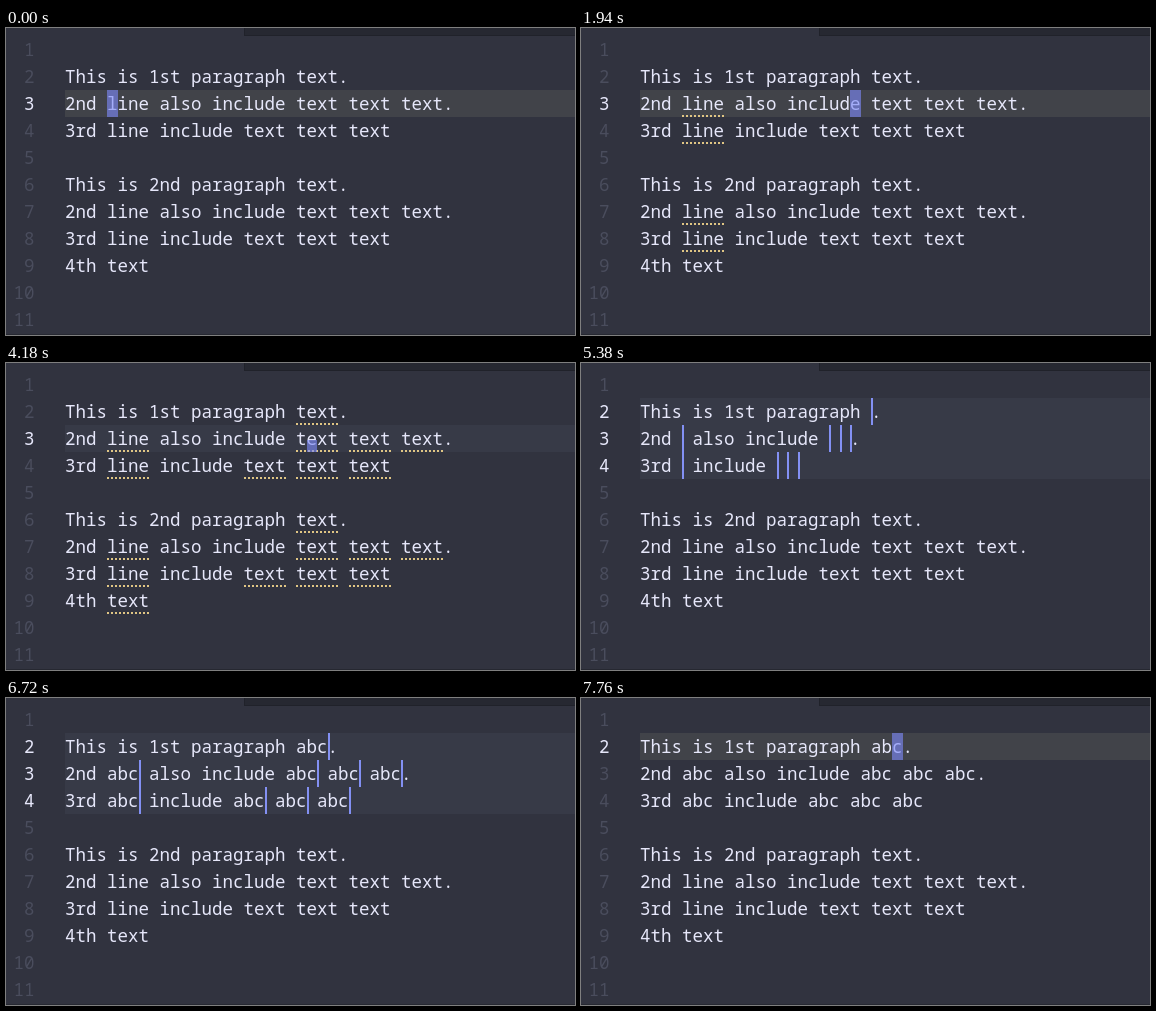
An HTML page with a canvas that plays this animation: 569x307 px, repeating every 8000 ms.

```html
<!DOCTYPE html>
<html lang="en">
<head>
<meta charset="utf-8">
<title>Multiple cursors in a text editor</title>
<style>
  html, body { margin: 0; width: 100%; height: 100%; overflow: hidden; background: #31333f; }
  canvas { display: block; }
</style>
</head>
<body>
<canvas id="stage" width="569" height="307"></canvas>
<script>
const ctx = document.getElementById('stage').getContext('2d');
const WIDTH = 569, HEIGHT = 307, LOOP = 8000;
const LEFT = 59, TOP = 8, CELL = 10.5, ROW = 27, ROW_COUNT = 11;
const FONT = '17.5px "Noto Sans Mono", "DejaVu Sans Mono", monospace';
const COLOR = {
  back: '#31333f', tabBar: '#262831', border: '#20222a',
  text: '#e6e7fa', gutter: '#4a4d5d',
  normalLine: '#414349', pendingLine: '#373a47',
  block: 'rgba(124, 138, 248, 0.62)', bar: '#8390f3', underline: '#dfc584'
};

const LINES = [
  '',
  'This is 1st paragraph text.',
  '2nd line also include text text text.',
  '3rd line include text text text',
  '',
  'This is 2nd paragraph text.',
  '2nd line also include text text text.',
  '3rd line include text text text',
  '4th text'
];
const EDITED_ROWS = [1, 2, 3];

const EDIT = 5380, ESCAPE = 7310, COLLAPSE = 7760, PENDING = 4180;
const CURSOR_STEPS = [[0, 4], [150, 5], [1350, 6], [1490, 7], [1640, 11],
  [1790, 15], [1940, 20], [2090, 22], [2380, 23]];
const TYPING = [[0, ''], [6280, 'a'], [6420, 'ab'], [6720, 'abc']];
const MARKS = [[450, /line/g], [2680, /text/g]];

const latest = (steps, t) => steps.filter(([start]) => start <= t).pop()[1];
const between = (t, from, to) => t >= from && t < to;
const colX = col => Math.round(LEFT + col * CELL);
const rowY = row => TOP + row * ROW;

function fill(color, x, y, w, h) {
  ctx.fillStyle = color;
  ctx.fillRect(x, y, w, h);
}

function write(text, x, row, color, weight) {
  ctx.font = `${weight} ${FONT}`;
  ctx.fillStyle = color;
  [...text].forEach((char, i) => ctx.fillText(char, x + i * CELL, rowY(row) + 20));
}

function block(row, col, top = 0) {
  fill(COLOR.block, colX(col), rowY(row) + top, colX(col + 1) - colX(col), ROW - top);
}

function underline(row, col, length) {
  const end = colX(col + length);
  for (let x = colX(col); x < end; x += 4) {
    fill(COLOR.underline, x, rowY(row) + 25, Math.min(2, end - x), 2);
  }
}

// Replaces every marked word and reports the column after each replacement.
function replaceWords(line, typed) {
  const parts = line.split(/line|text/);
  let col = 0;
  const cursors = parts.slice(0, -1).map(part => col += part.length + typed.length);
  return { text: parts.join(typed), cursors };
}

function drawPage(lines, activeRows, lineColor) {
  fill(COLOR.back, 0, 0, WIDTH, HEIGHT);
  fill(COLOR.tabBar, 238, 0, WIDTH - 238, 7);
  fill(COLOR.border, 238, 7, WIDTH - 238, 1);
  fill(COLOR.border, 238, 0, 1, 8);
  fill(COLOR.tabBar, 0, 306, WIDTH, 1);
  activeRows.forEach(row => fill(lineColor, LEFT, rowY(row), WIDTH - LEFT, ROW));
  for (let row = 0; row < ROW_COUNT; row++) {
    const label = String(row + 1);
    const color = activeRows.includes(row) ? COLOR.text : COLOR.gutter;
    write(label, 28.5 - label.length * CELL, row, color, 400);
  }
  lines.forEach((line, row) => write(line, LEFT, row, COLOR.text, 500));
}

function drawSelecting(t) {
  const pending = t >= PENDING;
  drawPage(LINES, [2], pending ? COLOR.pendingLine : COLOR.normalLine);
  for (const [start, word] of MARKS) {
    if (t < start) continue;
    LINES.forEach((line, row) => {
      for (const match of line.matchAll(word)) underline(row, match.index, 4);
    });
  }
  if (!between(t, 4480, 4930)) block(2, latest(CURSOR_STEPS, t), pending ? 15 : 0);
}

function drawEditing(t) {
  const typed = latest(TYPING, t);
  const edits = LINES.map((line, row) =>
    EDITED_ROWS.includes(row) ? replaceWords(line, typed) : { text: line, cursors: [] });
  const inserting = t < ESCAPE;
  const activeRows = t < COLLAPSE ? EDITED_ROWS : [1];
  const hidden = between(t, 5830, 6280) || between(t, 7170, ESCAPE);

  drawPage(edits.map(edit => edit.text), activeRows,
    inserting ? COLOR.pendingLine : COLOR.normalLine);
  if (hidden) return;
  for (const row of activeRows) {
    for (const col of edits[row].cursors) {
      if (inserting) fill(COLOR.bar, colX(col), rowY(row), 2, ROW);
      else block(row, col - 1);
    }
  }
}

function frame() {
  const t = performance.now() % LOOP;
  (t < EDIT ? drawSelecting : drawEditing)(t);
  requestAnimationFrame(frame);
}
frame();
</script>
</body>
</html>
```
